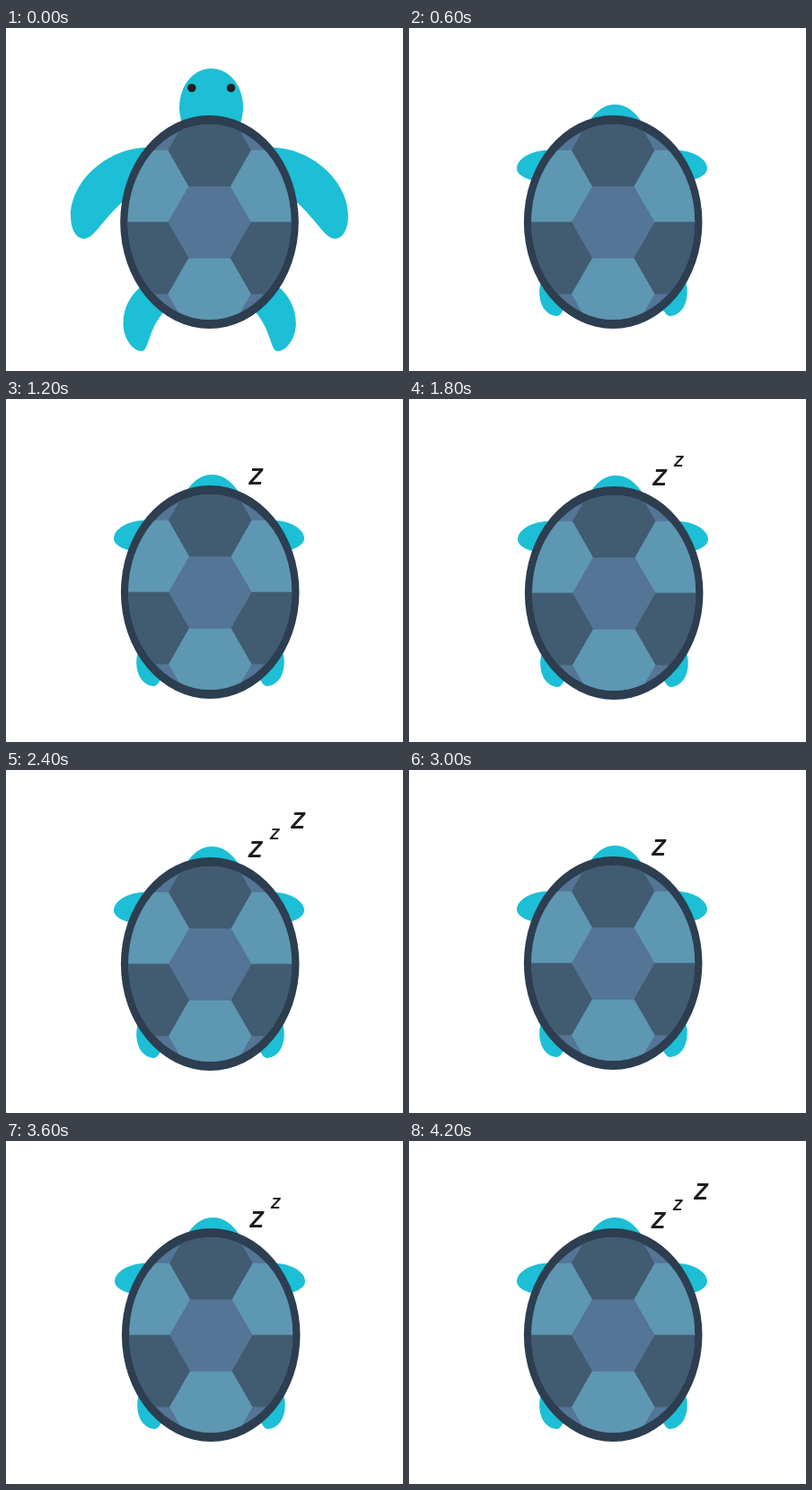
These frames come from a looping animation (442x381 px, 4800 ms). An HTML page:

```html
<!DOCTYPE html>
<html lang="en">
<head>
<meta charset="utf-8">
<title>Sleepy turtle</title>
<style>
  html, body { margin: 0; width: 100%; height: 100%; overflow: hidden; background: #fff; }
  svg { display: block; width: 442px; height: 381px; }
  .skin { fill: #1cbfd5; }
  .dark { fill: #415b71; }
  .light { fill: #5e97b1; }
  .mid { fill: #547595; }
  text { font: italic bold 25px "Liberation Sans", Arial, sans-serif; fill: #1e1c20; }
  .small { font-size: 17px; }
</style>
</head>
<body>
<svg viewBox="0 0 442 381">
  <defs>
    <clipPath id="inside"><ellipse cx="227.2" cy="215.5" rx="91" ry="108.5"/></clipPath>
    <path id="arm" d="M165 133C115 129 72 170 72 208C72 224 78 234 87 234C98 234 106 214 132 191L165 180Z"/>
    <path id="leg" d="M152 286C138 296 130.500 312 130.500 328C130.500 346 142 359 151 359C159 359 158 335 176 315Z"/>
    <path id="arm-in" d="M160 136C138 134 120 145 120 156C120 163 131 169 144 170Z"/>
    <path id="leg-in" d="M148 280C142 292 145 318 164 320C169 320 171 314 176 306Z"/>
  </defs>

  <g id="awake" class="skin">
    <use href="#arm"/><use href="#arm" transform="matrix(-1 0 0 1 453 0)"/>
    <use href="#leg"/><use href="#leg" transform="matrix(-1 0 0 1 453.300 0)"/>
    <path d="M193 89C193 62 210 45 228.500 45S264 62 264 89Q264 101 257 115H200Q193 101 193 89Z"/>
    <g fill="#231f20"><circle cx="206.800" cy="66.600" r="4.700"/><circle cx="250.500" cy="66.600" r="4.700"/></g>
  </g>

  <g id="asleep">
    <g class="skin">
      <use href="#arm-in"/><use href="#arm-in" transform="matrix(-1 0 0 1 452 0)"/>
      <use href="#leg-in"/><use href="#leg-in" transform="matrix(-1 0 0 1 455 0)"/>
      <path d="M199 106C208 92 217 85 229.300 85S251 92 260 106Z"/>
    </g>
  </g>

  <g id="shell">
    <ellipse cx="227.200" cy="215.500" rx="99.300" ry="118.500" fill="#2c3e50"/>
    <g clip-path="url(#inside)">
      <path class="mid" d="M120 90H340V340H120Z"/>
      <path class="light" d="M120 135.700H340V215.500H120Z"/>
      <path class="dark" d="M120 215.500H340V295.500H120Z"/>
      <path class="dark" d="M204 96H250.500L273.500 135.700L250.500 176H204L181 135.700Z"/>
      <path class="light" d="M204 255.500H250.500L273.500 295.500L250.500 335H204L181 295.500Z"/>
      <path class="mid" d="M204 176H250.500L273.500 215.500L250.500 255.500H204L181 215.500Z"/>
    </g>
  </g>

  <g id="snore"><text>Z</text><text class="small">Z</text><text>Z</text></g>
</svg>
<script>
const STEP = 600, STEPS = 8;
const $ = id => document.getElementById(id);
const letters = [...$("snore").children];

// Body offset and baseline positions of the visible letters.
const SLEEP = [
  { body: [0, -1], z: [[270.5, 95]] },
  { body: [1, 0], z: [[271.5, 96], [295, 75]] },
  { body: [0, 0], z: [[270, 97], [294, 77], [317.5, 65]] }
];
const AWAKE = { body: [-0.7, 0], z: [] };
const DOZING = { body: [0, 0], z: [] };

function poseAt(step) {
  if (step === 0) return AWAKE;
  return step === 1 ? DOZING : SLEEP[(step - 2) % 3];
}

function draw(now) {
  const pose = poseAt(Math.floor(now / STEP) % STEPS);
  const awake = pose === AWAKE, move = `translate(${pose.body})`;
  $("awake").style.display = awake ? "" : "none";
  $("asleep").style.display = awake ? "none" : "";
  $("asleep").setAttribute("transform", move);
  $("shell").setAttribute("transform", move);
  letters.forEach((letter, i) => {
    const at = pose.z[i];
    letter.style.display = at ? "" : "none";
    if (at) letter.setAttribute("transform", `translate(${at})`);
  });
}

const start = performance.now();
function tick() {
  draw(performance.now() - start);
  requestAnimationFrame(tick);
}
tick();
</script>
</body>
</html>
```
